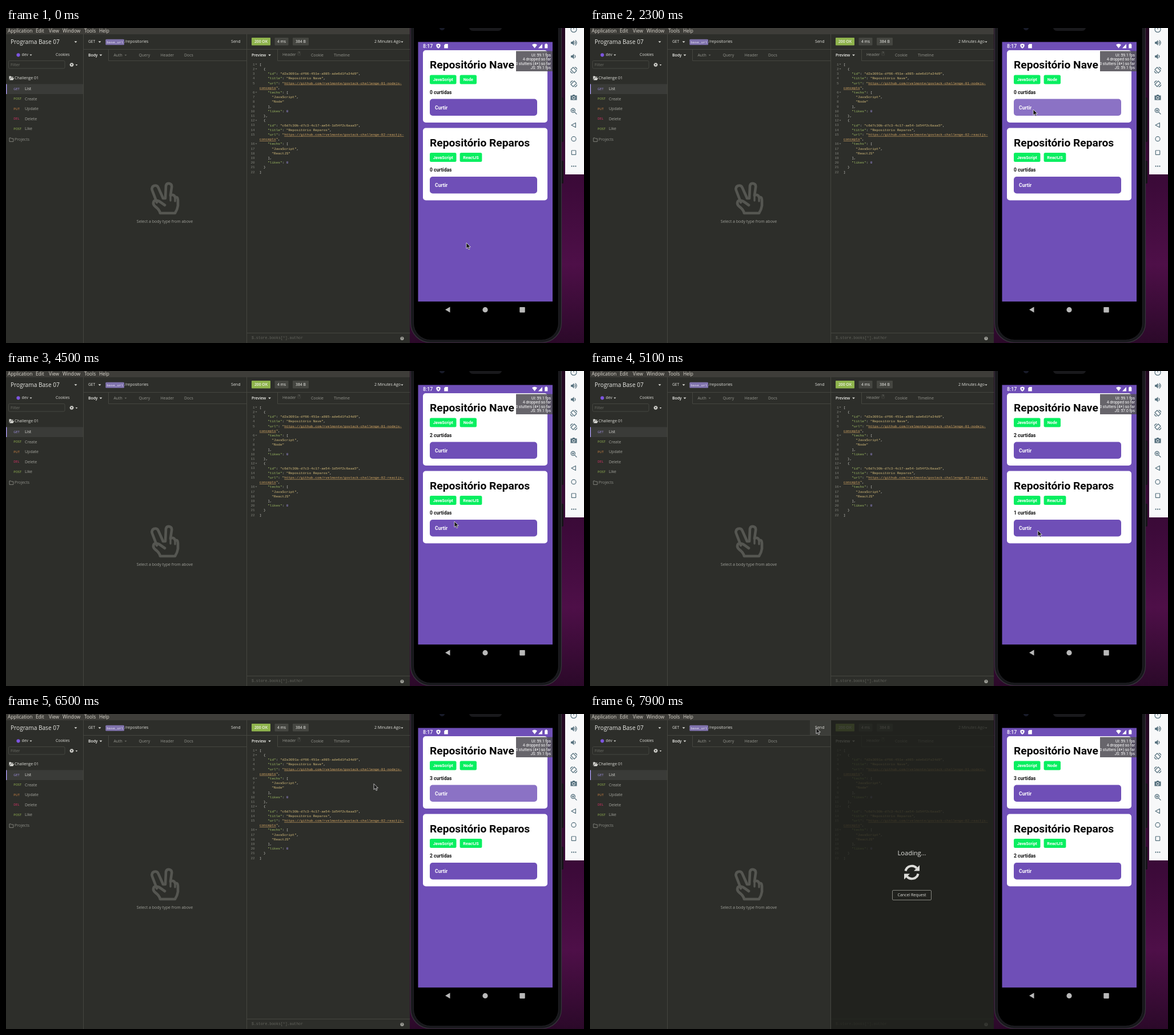
An HTML page that plays this animation: 1012x553 px, repeating every 8000 ms.

```html
<!DOCTYPE html>
<html lang="en">
<head>
<meta charset="utf-8">
<title>Likes demo</title>
<style>
  html, body { margin: 0; width: 100%; height: 100%; overflow: hidden; background: #2d2e2a; }
  svg { display: block; width: 1012px; height: 553px; }
  text { white-space: pre; font-family: "Open Sans", "Noto Sans", sans-serif; }
  .mono { font-family: "Liberation Mono", "DejaVu Sans Mono", monospace; }
  .droid { font-family: Roboto, sans-serif; }
  .line { fill: none; stroke-linecap: round; stroke-linejoin: round; }
</style>
</head>
<body>
<svg id="stage" viewBox="0 0 1012 553" xmlns="http://www.w3.org/2000/svg"></svg>
<script>
const LOOP = 8000, STEP = 100;
const BG = '#2d2e2a', EDGE = '#454640', DIM = '#93948d', LIGHT = '#deded9';
const PURPLE = '#6f4fb7', SLATE = '#546f7c';

// Drawing helpers; text is centred vertically on y.
const text = (x, y, str, { size = 7, fill = LIGHT, cls = '', weight = 400, anchor = 'start', id = '' } = {}) =>
  `<text x="${x}" y="${y + size * 0.35}" font-size="${size}" fill="${fill}" class="${cls}" ` +
  `font-weight="${weight}" text-anchor="${anchor}" id="${id}">${str}</text>`;
const rect = (x, y, w, h, fill, r = 0, extra = '') =>
  `<rect x="${x}" y="${y}" width="${w}" height="${h}" rx="${r}" fill="${fill}" ${extra}/>`;
const circle = (x, y, r, fill, extra = '') => `<circle cx="${x}" cy="${y}" r="${r}" fill="${fill}" ${extra}/>`;
const path = (d, fill, extra = '') => `<path d="${d}" fill="${fill}" ${extra}/>`;
const stroke = (d, color, width = 1, extra = '') =>
  `<path class="line" d="${d}" stroke="${color}" stroke-width="${width}" ${extra}/>`;
const caret = (x, y, fill = LIGHT, w = 2.4) => path(`M${x - w} ${y - w / 2}h${2 * w}l${-w} ${w * 1.15}z`, fill);
const at = (x, y, body) => `<g transform="translate(${x} ${y})">${body}</g>`;

function sidebar() {
  const requests = [
    ['GET', 'List', '#a899f0'], ['POST', 'Create', '#9dbf55'], ['PUT', 'Update', '#d98a45'],
    ['DEL', 'Delete', '#e0336b'], ['POST', 'Like', '#9dbf55']
  ];
  const rows = requests.map(([verb, name, color], i) => {
    const y = 107 + i * 17.5;
    return text(13.3, y, verb, { size: 5.6, fill: color }) +
      text(33, y, name, { fill: i ? '#a3a49d' : LIGHT });
  }).join('');
  return text(8, 24, 'Programa Base 07', { size: 10.15, fill: '#e8e8e4' }) + caret(122, 24.5) +
    circle(21.5, 47.3, 3.1, '#7d55e0') + text(27.5, 47, 'dev', { size: 6.9 }) + caret(43.5, 47.5, LIGHT, 2) +
    text(87, 47, 'Cookies', { size: 6.7 }) +
    rect(4.5, 57.5, 98.5, 13.5, 'none', 2, `stroke="${EDGE}"`) + text(8, 64.5, 'Filter', { fill: '#6d6e67' }) +
    circle(115, 64.5, 2, 'none', `stroke="${LIGHT}" stroke-width="1.7"`) +
    circle(115, 64.5, 3.2, 'none', `stroke="${LIGHT}" stroke-width="1" stroke-dasharray="1.3 1.2"`) +
    caret(123.5, 65, LIGHT, 1.8) +
    path('M5.5 91V84.5h3l1 1.2h3.2v1.5H8z', LIGHT) + path('M6.2 91.5l2-3.6h6l-2 3.6z', LIGHT) +
    text(15, 88, 'Challenge 01') +
    rect(0, 98.5, 135, 17.5, '#3a3b38') + rect(0, 98.5, 1.4, 17.5, '#a899f0') + rows +
    stroke('M6 199v-6h2.6l.9 1.1h3.4v4.9z', '#8a8b84', 0.9) + text(15, 196, 'Projects', { fill: '#8f9089' });
}

function requestPane() {
  const tabs = [[188.5, 'Auth'], [232.5, 'Query'], [270.5, 'Header'], [312, 'Docs']];
  const hand = 'M264 306L256 285Q254 279 259 277Q265 275 267 281L275 299H279L280 277Q281 272 286 273Q291 274 290 280' +
    'L288 294Q294 291 296 297Q301 296 301 302V312Q300 319 296 325H270Q268 318 262 314Q256 309 259 304Q262 301 268 304L278 311';
  return rect(385, 11, 36, 26, '#3c3d39', 0, 'id="hover"') +
    text(144, 24, 'GET', { size: 6.7 }) + caret(164, 24.5) +
    rect(174.3, 19.8, 32.7, 10, '#7f72ac', 1.5) + text(176.2, 24.7, 'base_url', { size: 6.1, cls: 'mono', fill: '#e9e5f5' }) +
    text(208, 24, '/repositories') + text(394, 24, 'Send', { size: 7.1 }) +
    text(144, 47.3, 'Body', { weight: 600, size: 6.8, fill: '#f0f0ec' }) + caret(166, 47.8) +
    tabs.map(([x, s]) => text(x, 47.3, s, { fill: DIM, size: 6.9 })).join('') + caret(209.5, 47.8, '#696a63', 2) +
    stroke('M135.5 37.5H421M179.5 37.5V57.5H421', EDGE) +
    stroke(hand, '#555651', 4.6) + stroke('M288 294V303M296 297V304', '#555651', 3.4) +
    text(278, 340, 'Select a body type from above', { anchor: 'middle', fill: '#a0a19a' });
}

const repo = (id, name, tech, slug) => [
  '  {', `    "id": "${id}",`, `    "title": "Repositório ${name}",`,
  `    "url": "https://github.com/rvelmonte/gostack-challenge-${slug}-`, '~concepts",',
  '    "techs": [', '      "JavaScript",', `      "${tech}"`, '    ],', '    "likes": 0'
];

function paint(line) {
  const span = (s, fill, extra = '') => `<tspan fill="${fill}" ${extra}>${s}</tspan>`;
  const link = s => span(s, '#d5a764', 'text-decoration="underline"');
  if (line[0] === '~') return link('concepts') + span('"', '#d5bd7c') + ',';
  return line.replace(/"[^"]*"?|\d+/g, (s, i) => {
    if (/^\d/.test(s)) return span(s, '#a899f0');
    if (s.startsWith('"http')) return span('"', '#d5bd7c') + link(s.slice(1));
    return span(s, line[i + s.length] === ':' ? '#9fbd64' : '#d5bd7c');
  });
}

function code() {
  const lines = ['[',
    ...repo('d2a3091a-df66-451e-a985-ade6d1fa34d9', 'Nave', 'Node', '01-nodejs'), '  },',
    ...repo('c6d7c30b-d7c3-4c17-ae54-1d54f2c6aaa5', 'Reparos', 'ReactJS', '02-reactjs'), '  }', ']'];
  let number = 0;
  return lines.map((line, row) => {
    const y = 63.6 + row * 8.215;
    const body = text(443.8, y, paint(line), { size: 6.02, cls: 'mono', fill: '#cfcfca' });
    if (line[0] === '~') return body;
    const fold = /[[{]$/.test(line) ? caret(438, y, '#7d7e77', 1.5) : '';
    return text(435.7, y, ++number, { size: 6, cls: 'mono', fill: '#83847d', anchor: 'end' }) + fold + body;
  }).join('');
}

function responsePane() {
  const chip = (x, w, s, fill, weight) =>
    rect(x, 17, w, 13.6, fill, 1) + text(x + w / 2, 24, s, { anchor: 'middle', weight, fill: '#f0f0ec', size: 6.8 });
  return chip(430, 33, '200 OK', '#8fb44d', 600) + chip(470.5, 24, '4 ms', '#454641', 400) +
    chip(502, 28, '384 B', '#454641', 400) +
    text(645, 24, '2 Minutes Ago', { size: 6.9 }) + caret(693.5, 24.5, LIGHT, 2) +
    text(430, 47.3, 'Preview', { weight: 600, size: 6.7, fill: '#f0f0ec' }) + caret(461.5, 47.8) +
    text(484, 47, 'Header', { fill: DIM, size: 6.9 }) +
    rect(510.5, 41.5, 5, 6.6, 'none', 1, `stroke="${EDGE}" stroke-width=".8"`) +
    text(513, 44.8, '7', { size: 4.6, fill: DIM, anchor: 'middle' }) +
    text(534, 47.3, 'Cookie', { fill: DIM, size: 6.9 }) + text(574, 47.3, 'Timeline', { fill: DIM }) +
    stroke('M422 37.5H707M475.5 37.5V57.5H707M422 535.5H707', EDGE) + code() +
    text(430, 544, '$.store.books[*].author', { size: 6.52, cls: 'mono', fill: '#62635c' }) +
    circle(693.5, 545, 3.1, '#a5a69f') + text(693.5, 545, '?', { size: 5, fill: BG, weight: 700, anchor: 'middle' });
}

function loading() {
  const arc = 'M-11 -2.5A11.3 11.3 0 0 1 8.5 -7.4';
  const half = stroke(arc, '#dcdcd8', 4, 'style="stroke-linecap:butt"') + path('M13.5 -12.5V-2.5H3.5z', '#dcdcd8');
  return `<g id="loading">${rect(422, 11, 285, 542, '#1f201c', 0, 'opacity=".82"')}` +
    text(563.5, 244, 'Loading...', { size: 11.1, anchor: 'middle', fill: '#e2e2de' }) +
    at(563.5, 278, `<g id="spinner">${half}<g transform="rotate(180)">${half}</g></g>`) +
    rect(529.5, 309.5, 68, 17, 'none', 1.5, 'stroke="#85867f"') +
    text(563.5, 318, 'Cancel Request', { anchor: 'middle' }) + '</g>';
}

function card(n, y, name, tech, tagWidth) {
  const bold = { cls: 'droid', weight: 700 };
  const tag = (x, w, s) => rect(x, y + 43.5, w, 16, '#08ef60', 2.5) +
    text(x + w / 2, y + 51.5, s, { ...bold, size: 7.3, fill: '#fff', anchor: 'middle' });
  return rect(730, y, 218, 127, '#fff', 5) +
    text(742, y + 25.4, `Repositório ${name}`, { ...bold, size: 19.22, fill: '#050505' }) +
    tag(742, 46.5, 'JavaScript') + tag(794.6, tagWidth, tech) +
    text(742, y + 74, '', { ...bold, size: 8.5, fill: '#111', id: `likes${n}` }) +
    `<g id="button${n}">${rect(742, y + 85.6, 188, 29.4, PURPLE, 5)}` +
    text(751, y + 100.7, 'Curtir', { ...bold, size: 8.6, fill: '#fff' }) + '</g>';
}

function phone() {
  const fps = (y, s, id) => text(954, y, s, { cls: 'droid', size: 6.76, fill: '#fff', anchor: 'end', id });
  return rect(971, 122, 5, 78, '#161318', 1.5) + rect(971, 233, 5, 40, '#161318', 1.5) +
    rect(708.5, -60, 264, 612, '#17171b', 34, 'stroke="#38363d" stroke-width="1.2"') +
    rect(713.5, -60, 254, 608, '#000', 30, 'stroke="#2a2a2f" stroke-width=".8"') +
    path('M811 0H868Q867 5 861 5H818Q812 5 811 0z', '#19191c') + circle(763.5, -0.5, 4.6, '#171a28') +
    rect(721.5, 24.5, 235.5, 455.7, PURPLE) +
    text(730, 32, '8:17', { cls: 'droid', size: 8.8, weight: 500, fill: '#fff' }) +
    path('M757 27.5l3.6 1.3v2.8q-.3 2.8-3.6 4.3q-3.3-1.5-3.6-4.3v-2.8z', '#fff') + circle(757, 31.4, 1.3, PURPLE) +
    path('M769.2 28h4.6v7.5h-6.6v-5.4z', '#fff') +
    path('M921 29.5q4.5-3.4 9 0l-4.5 6z', '#fff') + path('M939 28v7.5h-7z', '#fff') +
    path('M944.6 27.4h2.4v1h1.3v7.2h-5v-7.2h1.3z', '#fff') +
    card(1, 39, 'Nave', 'Node', 29.4) + card(2, 175.5, 'Reparos', 'ReactJS', 38.8) +
    rect(893, 40.5, 64, 35.5, '#525057', 0, 'opacity=".88"') +
    fps(47.3, 'UI: 59.1 fps', '') + fps(54.9, '4 dropped so far', '') +
    fps(62.5, '0 stutters (4+) so far', '') + fps(70.1, '', 'fps') +
    path('M769 494.5l8.5-5v10z', '#b9b9b9') + circle(839, 494.7, 4.6, '#b9b9b9') + rect(899.3, 490, 9.4, 9.4, '#b9b9b9', 0.8);
}

function toolbar() {
  const icon = (y, d, extra = '') => at(994, y, stroke(d, SLATE, 1.2, extra));
  const solid = (y, d) => at(994, y, path(d, SLATE));
  const speaker = 'M-5 -1.8h2.4l3-3v9.6l-3-3H-5z';
  const turn = 'M-5 -1L-1 -5L5 1L1 5zM2 -5.2q3.2 .6 3.6 3.4M-2 5.2q-3.2-.6-3.6-3.4';
  return rect(979, 0, 33, 257, '#f7f8f9') +
    icon(2, 'M-3.6 -3A5 5 0 1 0 3.6 -3M0 -5V0') +
    solid(26, speaker) + icon(26, 'M2 -2q1.8 2 0 4M3 -4.4q4.4 4.4 0 8.8') +
    solid(50, speaker) + icon(50, 'M2 -2q1.8 2 0 4') +
    icon(74, turn) + at(0, 98, `<g transform="translate(994 0) scale(-1 1)">${stroke(turn, SLATE, 1.2)}</g>`) +
    solid(122, 'M-5.5 -3.5h3l1.2-1.6h2.6l1.2 1.6h3v8h-11z') + circle(994, 122.6, 2.3, SLATE, 'stroke="#f7f8f9"') +
    icon(146, 'M1.6 1.6L5 5M-4.8 -1.2a3.6 3.6 0 1 0 7.2 0a3.6 3.6 0 1 0 -7.2 0M-3 -1.2h3.6M-1.2 -3v3.6') +
    icon(170.5, 'M-4 0L3.4 -4V4z') +
    circle(994, 194.7, 4, 'none', `stroke="${SLATE}" stroke-width="1.2"`) +
    rect(990.3, 215, 7.4, 7.4, 'none', 0.6, `stroke="${SLATE}" stroke-width="1.2"`) +
    [-3.4, 0, 3.4].map(dx => circle(994 + dx, 242.7, 1.1, SLATE)).join('');
}

document.getElementById('stage').innerHTML =
  `<defs><linearGradient id="wall" x2="0" y2="1"><stop stop-color="#220820"/><stop offset=".5" stop-color="#3c0a39"/>` +
  `<stop offset=".75" stop-color="#4e0f48"/><stop offset="1" stop-color="#2b0929"/></linearGradient></defs>` +
  rect(0, 0, 1012, 553, BG) + rect(707, 0, 305, 553, 'url(#wall)') +
  sidebar() + requestPane() + responsePane() + loading() +
  rect(0, 0, 707, 11, '#3e3d39') +
  [[3, 'Application'], [52, 'Edit'], [75, 'View'], [99, 'Window'], [137, 'Tools'], [163, 'Help']]
    .map(([x, s]) => text(x, 4.6, s, { size: 8.3, fill: '#dcd8cf' })).join('') +
  stroke('M135.5 11V553M421.5 11V553', EDGE) +
  phone() + toolbar() +
  `<g id="cursor">${path('M0 0V10.2L2.4 8L4.1 11.8L5.9 11L4.2 7.4H7.4z', '#161616', 'stroke="#e8e8e8" stroke-width=".8"')}</g>`;

// [time, x, y]: the pointer glides between these points.
const PATH = [
  [0, 806, 377], [200, 807, 377], [500, 810, 388], [700, 803, 350], [900, 790, 300], [1100, 783, 259],
  [1300, 822, 196], [1400, 830, 150], [1500, 812, 122], [1600, 795, 136.5], [1900, 776, 143], [2500, 776, 143],
  [2800, 770, 255], [3000, 772, 141.5], [3500, 772, 141.5], [3700, 775, 182], [3800, 775, 182],
  [4500, 785, 264], [4700, 784, 280], [5800, 784, 280], [6200, 778, 142], [6400, 778, 142],
  [6600, 510, 103], [6700, 510, 103], [6900, 381, 44], [7000, 391, 35], [7100, 391, 35], [7300, 396, 24.5], [8000, 396, 24.5]
];
// [time, value]: each value holds until the next time.
const LIKES = { 1: [[0, 0], [2400, 1], [3500, 2], [6400, 3]], 2: [[0, 0], [4800, 1], [5400, 2]] };
const FPS = [[0, '59.1'], [2400, '58.0'], [2800, '57.1'], [3600, '59.1'], [4000, '58.0'], [4300, '59.1'],
  [4900, '57.0'], [5400, '51.0'], [6200, '59.1'], [6900, '58.0'], [7200, '59.1']];
const PRESSES = { 1: [2200, 3400, 6400], 2: [4700, 5300] };

const $ = id => document.getElementById(id);
const held = (table, t) => table.filter(([start]) => start <= t).pop()[1];

function pointer(t) {
  const i = PATH.findIndex(([end]) => end > t);
  const [t0, x0, y0] = PATH[i - 1], [t1, x1, y1] = PATH[i];
  const k = (t - t0) / (t1 - t0);
  return [x0 + (x1 - x0) * k, y0 + (y1 - y0) * k];
}

function render(t) {
  $('cursor').setAttribute('transform', `translate(${pointer(t)})`);
  for (const n of [1, 2]) {
    $(`likes${n}`).textContent = `${held(LIKES[n], t)} curtidas`;
    const since = PRESSES[n].map(p => t - p).find(d => d >= 0 && d < 200);
    $(`button${n}`).setAttribute('opacity', since === undefined ? 1 : since < 100 ? 0.5 : 0.8);
  }
  $('fps').textContent = `JS: ${held(FPS, t)} fps`;
  $('hover').setAttribute('opacity', t >= 7200 ? 1 : 0);
  $('loading').setAttribute('opacity', Math.min(1, Math.max(0, (t - 7600) / 300)));
  $('spinner').setAttribute('transform', `rotate(${(t - 7900) * 0.18})`);
}

function tick() {
  render(Math.floor(performance.now() % LOOP / STEP) * STEP);
  requestAnimationFrame(tick);
}
tick();
</script>
</body>
</html>
```
